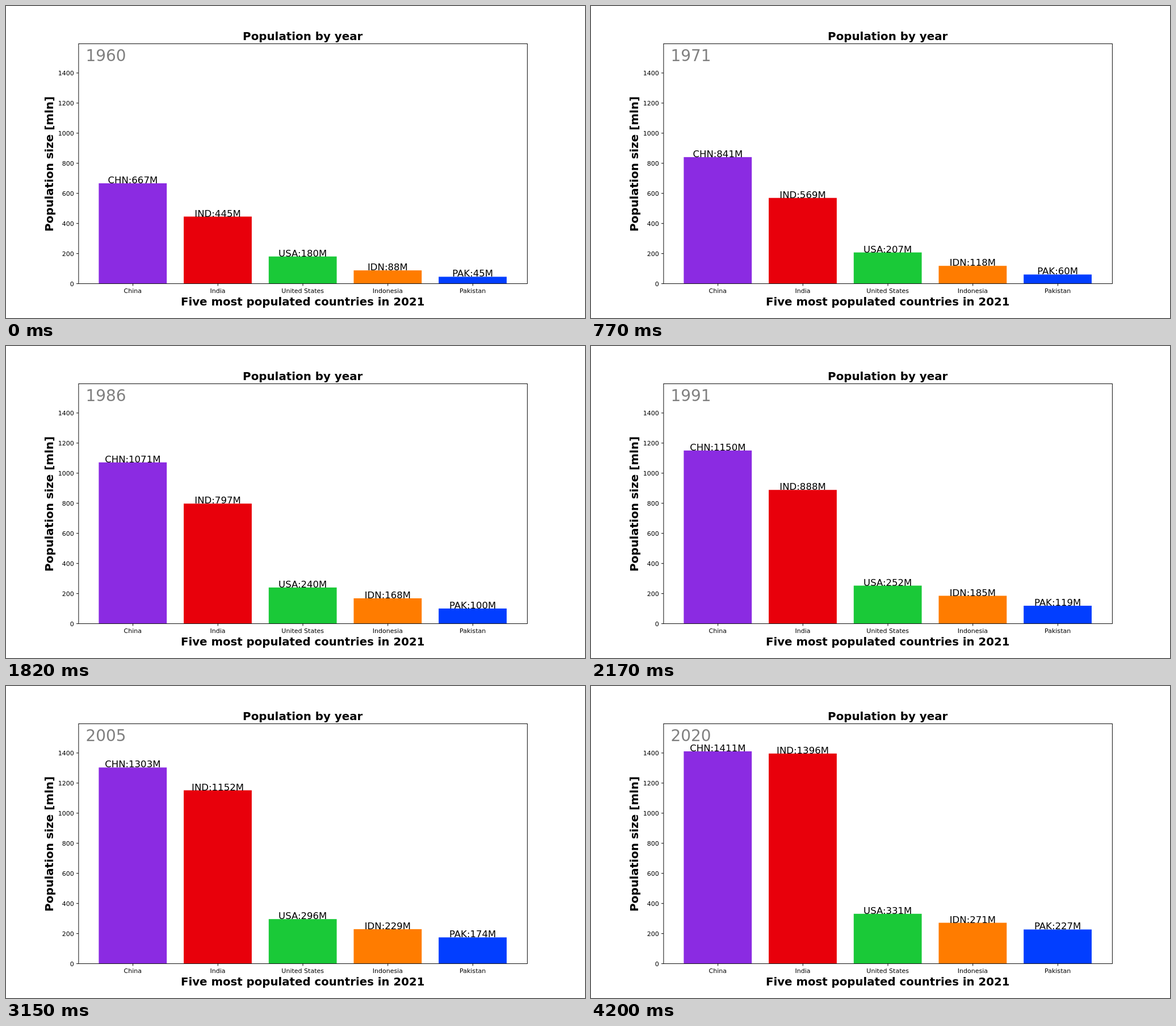
Recreate the animation shown at these times as an HTML page with a canvas. Size 1020x549 px, loop 4270 ms.

```html
<!DOCTYPE html>
<html lang="en">
<head>
<meta charset="utf-8">
<title>Population by year</title>
<style>
  html, body { margin: 0; width: 100%; height: 100%; overflow: hidden; background: #fff; }
  canvas { display: block; }
</style>
</head>
<body>
<canvas id="stage" width="1020" height="549"></canvas>
<script>
const ctx = document.getElementById('stage').getContext('2d');
const FIRST_YEAR = 1960, YEARS = 61, YEAR_MS = 70;
const plot = { left: 127.9, right: 918.4, top: 66.4, bottom: 488.6 };
const SLOT = 149.7, FIRST_BAR = 223.3, BAR_WIDTH = 119.8;
const PX_PER_MILLION = 0.2648;

// Key points in millions of people; a smooth curve joins them.
const countries = [
  { name: 'China', code: 'CHN', color: '#8b2be2',
    keys: { 1960: 667, 1962: 665.8, 1971: 841.1, 1976: 930.7, 1981: 993.9, 1991: 1150.8,
      1999: 1252.7, 2011: 1345, 2020: 1411.1 } },
  { name: 'India', code: 'IND', color: '#e8000b',
    keys: { 1960: 445.9, 1971: 569.9, 1981: 712.9, 1991: 888.9, 1999: 1040.5, 2011: 1257.6, 2020: 1396.4 } },
  { name: 'United States', code: 'USA', color: '#1ac938',
    keys: { 1960: 180.7, 1971: 207.6, 1981: 229.5, 1991: 252.9, 1999: 279, 2011: 311.6, 2020: 331.5 } },
  { name: 'Indonesia', code: 'IDN', color: '#ff7c00',
    keys: { 1960: 88.4, 1971: 118.5, 1981: 151.5, 1991: 185.4, 1999: 210.9, 2011: 247.1, 2020: 271.9 } },
  { name: 'Pakistan', code: 'PAK', color: '#023eff',
    keys: { 1960: 45.9, 1971: 60.9, 1981: 84.3, 1991: 119.2, 1999: 149.7, 2011: 198.6, 2020: 227.2 } }
];

// Cubic Hermite curve through unevenly spaced key points.
function population({ keys }, year) {
  const years = Object.keys(keys).map(Number), values = Object.values(keys);
  const last = years.length - 1;
  const secant = i => (values[i + 1] - values[i]) / (years[i + 1] - years[i]);
  const slope = i => {
    if (i === 0) return secant(0);
    if (i === last) return secant(last - 1);
    const w = (years[i] - years[i - 1]) / (years[i + 1] - years[i - 1]);
    return secant(i - 1) * (1 - w) + secant(i) * w;
  };
  const i = Math.max(0, years.findIndex(y => y >= year) - 1);
  const span = years[i + 1] - years[i], t = (year - years[i]) / span, u = 1 - t;
  return values[i] * u * u * (1 + 2 * t) + values[i + 1] * t * t * (3 - 2 * t)
    + span * t * u * (slope(i) * u - slope(i + 1) * t);
}

const yOf = millions => plot.bottom - millions * PX_PER_MILLION;
const xOf = slot => FIRST_BAR + slot * SLOT;

function text(str, x, y, size, { align = 'center', color = '#000', weight = 'normal' } = {}) {
  ctx.font = `${weight} ${size}px "DejaVu Sans", sans-serif`;
  ctx.textAlign = align;
  ctx.fillStyle = color;
  ctx.fillText(str, x, y);
}

function line(x1, y1, x2, y2) {
  ctx.beginPath();
  ctx.moveTo(x1, y1);
  ctx.lineTo(x2, y2);
  ctx.stroke();
}

function drawAxes() {
  const bold = { weight: 'bold' };
  const { left, right, top, bottom } = plot;
  const midX = (left + right) / 2 - 0.4;
  ctx.strokeStyle = '#000';
  ctx.lineWidth = 0.95;
  ctx.strokeRect(left, top, right - left, bottom - top);

  for (let v = 0; v <= 1400; v += 200) {
    line(left - 4, yOf(v), left, yOf(v));
    text(v, 119.8, yOf(v) + 4, 11.05, { align: 'right' });
  }
  countries.forEach(({ name }, i) => {
    line(xOf(i) + 0.3, bottom, xOf(i) + 0.3, bottom + 4);
    text(name, xOf(i), 505, 11.05);
  });

  text('Population by year', midX, 59.6, 19.85, bold);
  text('Five most populated countries in 2021', midX, 526.8, 19.75, bold);
  ctx.save();
  ctx.translate(83.3, 278);
  ctx.rotate(-Math.PI / 2);
  text('Population size [mln]', 0, 0, 19.85, bold);
  ctx.restore();
}

function draw(year) {
  ctx.fillStyle = '#fff';
  ctx.fillRect(0, 0, 1020, 549);
  const values = countries.map(c => population(c, year));

  countries.forEach(({ color }, i) => {
    ctx.fillStyle = color;
    ctx.fillRect(xOf(i) - BAR_WIDTH / 2, yOf(values[i]), BAR_WIDTH, values[i] * PX_PER_MILLION);
  });
  drawAxes();
  text(year, 140.4, 97, 27.9, { align: 'left', color: '#808080' });
  countries.forEach(({ code }, i) =>
    text(`${code}:${Math.floor(values[i])}M`, xOf(i), yOf(values[i]), 16.55));
}

function tick() {
  draw(FIRST_YEAR + Math.floor(performance.now() / YEAR_MS) % YEARS);
  requestAnimationFrame(tick);
}
tick();
</script>
</body>
</html>
```
